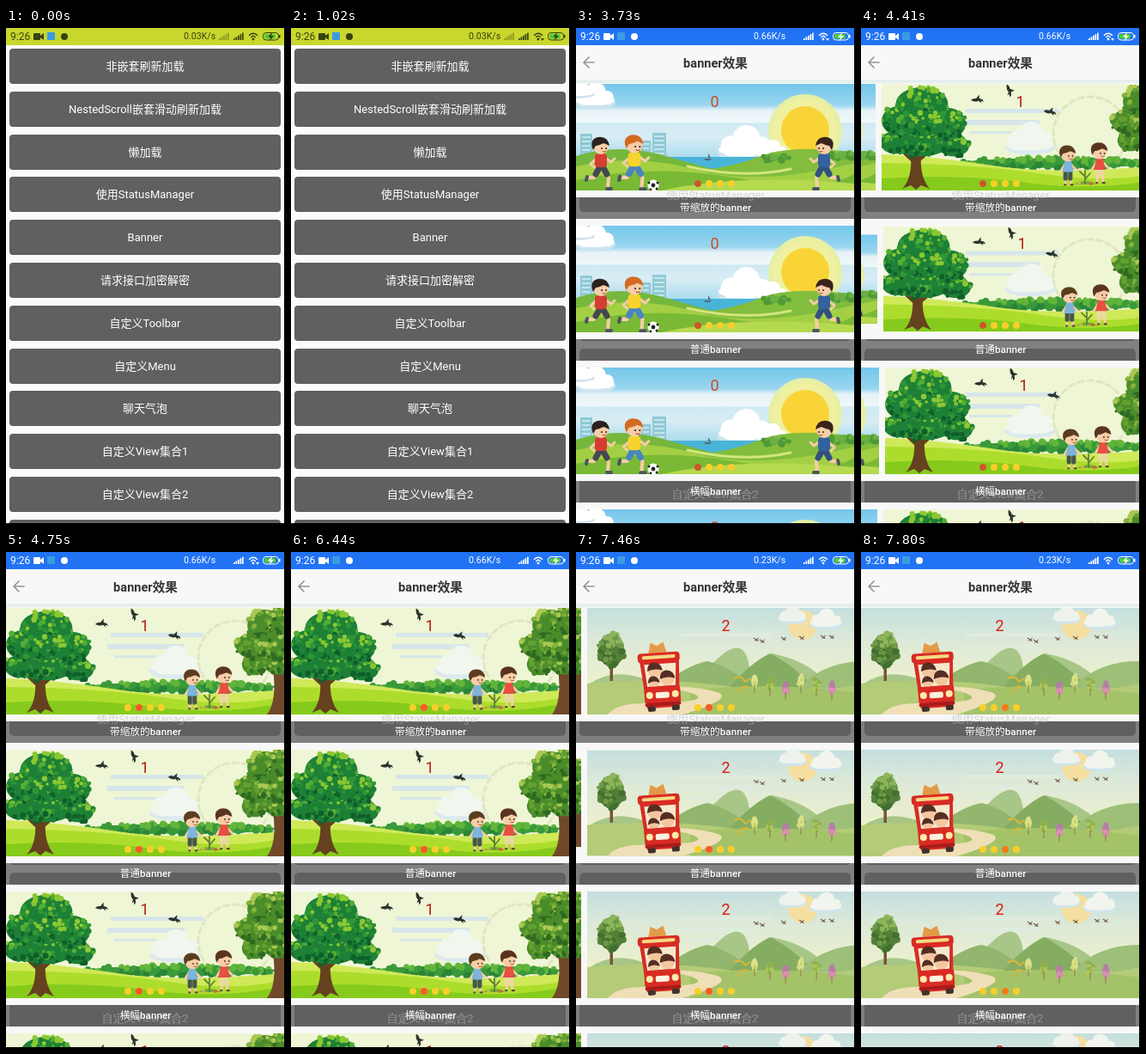
An HTML page for the animation above (8 s loop, 325 by 577 pixels).

```html
<!DOCTYPE html>
<html lang="zh">
<head>
<meta charset="utf-8">
<title>banner</title>
<style>
@property --pos { syntax: "<number>"; inherits: true; initial-value: 0; }
@property --halo { syntax: "<number>"; inherits: true; initial-value: 0; }
html, body { margin: 0; width: 100%; height: 100%; overflow: hidden; }
body { background: #fbfbfb; font-family: Roboto, "Noto Sans CJK SC", "Noto Sans CJK", sans-serif; }
#stage { position: absolute; left: 0; top: 0; width: 325px; height: 577px; overflow: hidden; background: #fbfbfb; }
#stage div, #stage svg { position: absolute; }
.page, #status, #speed, .slides, .active, .arrow, .weak { animation: 8s step-end infinite; }

#status { left: 0; top: 0; width: 325px; height: 20px; animation-name: status; }
#status > div { white-space: nowrap; line-height: 20px; }
#clock { left: 5px; font-size: 12px; }
#rate { left: 207px; width: 40px; height: 20px; overflow: hidden; font-size: 10.6px; }
#speed { animation-name: speed; }
.weak { animation-name: weak; }
.arrow { animation-name: arrow; }

.button { left: 4px; width: 316px; height: 41px; border-radius: 4px; background: #606060;
  color: #fff; font-size: 13px; line-height: 42px; text-align: center; }

.page { animation-name: page; }
#head { left: 0; top: 20px; width: 325px; height: 40px; background: #f8f8f8; border-bottom: 4px solid #e6eeee; }
#title { width: 325px; text-align: center; font: 700 14.6px/42px Roboto, "Noto Sans CJK SC", "Noto Sans CJK", sans-serif; color: #333; }
.block { left: 0; width: 325px; height: 140px; background: #f8f8f8; }
.slides { left: 0; top: 8px; width: 325px; height: 124px; overflow: hidden; animation-name: slides; }
.slide { --d: calc((var(--i) * 332 - var(--pos)) / 332);
  transform: translateX(calc(var(--d) * 332px)) scaleY(calc(1 - var(--shrink) * max(var(--d), -1 * var(--d)))); }
.num { font-size: 18px; text-anchor: middle; }
.fixed { transform: translateX(calc((var(--pos) - var(--i) * 332) * 1px)); }
.halo { opacity: var(--halo); }
.dot { top: 112px; width: 8px; height: 8px; border-radius: 50%; background: #f8cf2a; }
.active { left: 138px; animation-name: active; }
.label { left: 0; width: 325px; height: 25px; }
.tint { inset: 0; background: #808080; mix-blend-mode: darken; }
.text { width: 325px; text-align: center; color: #fff; font-size: 11.7px; font-weight: 500; line-height: 25px; }
#trace { left: 0; top: 189px; width: 325px; height: 8px; overflow: hidden; text-align: center; font-size: 13px; color: #d4d4d4; }
#trace div { top: -4px; width: 325px; line-height: 20px; }
#edge { inset: 0; border: solid #000; border-width: 0 1px 1px 0; }

@keyframes status { 0% { background: #c8d62e; color: #37420f; } 21.25%, 100% { background: #2173f4; color: #fff; } }
@keyframes speed { 0% { transform: none; } 46.625% { transform: translateY(-20px); } 93.25%, 100% { transform: translateY(-40px); } }
@keyframes weak { 0% { opacity: .4; } 21.25%, 100% { opacity: 0; } }
@keyframes arrow { 0% { opacity: 0; } 12.75% { opacity: 1; } 80.5%, 100% { opacity: 0; } }
@keyframes page { 0% { visibility: hidden; } 21.25%, 100% { visibility: visible; } }
@keyframes slides {
  0% { --pos: 0; --halo: 1; }
  55.125% { --pos: calc(308 - var(--lag)); --halo: 1; }
  59.375% { --pos: 332; --halo: 1; }
  89% { --pos: calc(408 + var(--lead)); --halo: 0; }
  93.25% { --pos: 651; --halo: 0; }
  97.5%, 100% { --pos: 664; --halo: 0; }
}
@keyframes active {
  0% { transform: none; background: #c8582a; }
  59.375% { transform: translateX(13px); background: #fb5a28; }
  97.5%, 100% { transform: translateX(26px); background: #f07a1c; }
}
</style>
</head>
<body>
<div id="stage"></div>
<script>
const stage = document.getElementById('stage');
let seed = 11;
const rnd = () => (seed = seed * 16807 % 2147483647) / 2147483647;
const times = (n, fn) => Array.from({ length: n }, (_, i) => fn(i)).join('');
const path = (d, fill, extra = '') => `<path d="${d}" fill="${fill}" ${extra}/>`;
const line = (d, color, w) => path(d, 'none', `stroke="${color}" stroke-width="${w}" stroke-linecap="round" stroke-linejoin="round"`);
const disc = (x, y, r, fill) => `<circle cx="${x}" cy="${y}" r="${r}" fill="${fill}"/>`;
const oval = (x, y, rx, ry, fill) => `<ellipse cx="${x}" cy="${y}" rx="${rx}" ry="${ry}" fill="${fill}"/>`;
const box = (x, y, w, h, fill, rx = 0) => `<rect x="${x}" y="${y}" width="${w}" height="${h}" rx="${rx}" fill="${fill}"/>`;
const at = (x, y, s, art, turn = 0) => `<g transform="translate(${x} ${y}) rotate(${turn}) scale(${s})">${art}</g>`;
const grad = (id, stops) => `<linearGradient id="${id}" x2="0" y2="1">${stops.map(([o, c]) =>
  `<stop offset="${o}" stop-color="${c}"/>`).join('')}</linearGradient>`;

// Scatter leaves inside an oval; colors run from dark (low) to light (high)
const leaves = (x, y, rx, ry, n, r, colors) => oval(x, y, rx * .95, ry * .95, colors[1]) + times(n, () => {
  const a = rnd() * 6.283, d = Math.sqrt(rnd()), lift = .5 - Math.sin(a) * d / 2 + (rnd() - .5) * .7;
  const tone = Math.max(0, Math.min(colors.length - 1, Math.floor(lift * colors.length)));
  return disc((x + Math.cos(a) * d * rx).toFixed(1), (y + Math.sin(a) * d * ry).toFixed(1),
    (r * (.5 + rnd() * .6)).toFixed(1), colors[tone]);
});
const crown = (clumps, colors) => clumps.map(([x, y, rx, ry]) => leaves(x, y, rx, ry, Math.round(rx * ry / 9), 3.2, colors)).join('');
const cloud = (x, y, s, top = '#fff', base = '#cfe4ee') => at(x, y, s,
  oval(0, 7, 24, 7, base) + disc(-12, 1, 9, top) + disc(1, -5, 12, top) + disc(14, 1, 8, top) + oval(0, 4, 23, 6, top));
const swallow = (x, y, turn) => at(x, y, .9, path('M-8 1Q-5-2-1-1L3-6 3-1 7 0 9 3 5 2 6 5 2 2-1 3Q-4 3-8 1Z', '#2d332b'), turn);
const bird = (x, y) => at(x, y, .55, path('M-7-2Q-2-3 0 1L6-3 3 2 5 6 0 4-4 5-2 2Z', '#7b6457'));

const kid = (x, y, s, hair, shirt, pants, run) => {
  const skin = '#f6cda6';
  const legs = run
    ? line('M-2 27L-8 36-15 36M3 27L9 36 8 48', skin, 4) + line('M-2 25L-6 32M3 25L7 32', pants, 7)
      + line('M-16 35L-17 39M7 49L12 49', '#4a5660', 4)
    : line('M-3 28V37M4 28V37', skin, 3) + line('M-3 23V30M3 23V30', pants, 5.5) + line('M-4 38H-3M4 38H6', '#634633', 2.5);
  const arms = run ? 'M-4 13L-12 20-8 24M5 13L12 18 16 14' : 'M-4 13L-9 21M4 13L11 20';
  const body = run ? box(-7, 8, 14, 16, shirt, 4) : path('M-4 8H4L7 22H-7Z', shirt);
  return `<g transform="translate(${x} ${y}) scale(${s})">` + legs + line(arms, skin, 3) + body
    + disc(0, 0, 9, skin) + path('M-9 4Q-14-8-4-11 8-13 10-1 6-3 3-4-3-1-6-1Z', hair)
    + disc(1, 2, 1, '#33241c') + disc(6, 2, 1, '#33241c') + line('M2 5.5Q4 7 6 5.5', '#b64a32', 1) + '</g>';
};
const tower = (x, y, w, h) => box(x, y, w, h, '#8fc9d6') + times(Math.floor(h / 5), i => box(x + 2, y + 3 + i * 5, w - 4, 2, '#c5e5ea'));
const num = (n, c) => `<text class="num" x="161.5" y="26.5" fill="${c}">${n}</text>`;

const shrubs = ['#4f9a35', '#6cb044'];
const football = box(0, 0, 325, 124, 'url(#skyA)')
  + disc(267, 55, 43, '#e6efa5') + disc(267, 55, 38, '#eff0a0') + disc(267, 54, 28, '#f9d437')
  + cloud(22, 15, 1) + cloud(5, 7, .7) + cloud(197, 71, 1.35) + cloud(228, 78, .8)
  + tower(5, 58, 14, 30) + tower(20, 66, 9, 20) + tower(76, 66, 11, 22) + tower(89, 57, 16, 30)
  + box(95, 85, 120, 15, '#48b4d8') + path('M149 87H158L156 89H151ZM154 81L157 86H154Z', '#536a73')
  + path('M0 84Q50 68 105 84T175 102V124H0Z', '#76b73e')
  + path('M140 101Q180 98 215 84T325 80V124H120Z', '#82bd3d')
  + leaves(232, 86, 18, 4, 15, 4, shrubs) + leaves(312, 84, 16, 5, 15, 4, shrubs)
  + path('M0 96Q70 80 140 100T325 92V124H0Z', '#a3cf45')
  + path('M0 112Q90 92 190 110T325 104V124H0Z', '#79b935')
  + path('M100 124Q190 104 325 116V124Z', '#b5d94f')
  + line('M130 96Q195 111 250 99', '#d3e57c', 3)
  + kid(29, 73, 1, '#2b211f', '#d53d32', '#45474f', true) + kid(68, 71, 1.05, '#d56922', '#f7d32d', '#4a86bd', true)
  + `<g transform="translate(289 73) scale(-1 1)">${kid(0, 0, 1, '#3a241b', '#3361a0', '#31517f', true)}</g>`
  + disc(90, 118, 6.5, '#fff') + disc(90, 118, 2.4, '#222') + disc(85, 115, 1.5, '#222') + disc(95, 115, 1.5, '#222') + disc(87, 123, 1.4, '#222') + disc(94, 122, 1.4, '#222')
  + num(0, '#cf4b22');

// Pale leftovers that stay in place while the slides move
const streaks = color => `<g class="fixed">` + box(122, 29, 108, 5, color) + box(118, 42, 90, 6, color) + box(126, 55, 50, 3, color) + '</g>';
const halo = `<g class="fixed"><g class="halo">` + cloud(197, 65, 1.25, '#f1f6ee', '#dce9ee')
  + `<circle cx="267" cy="58" r="43" fill="none" stroke="#e1e6c2" stroke-width="3" stroke-dasharray="9 2"/></g></g>`;

const oak = ['#0f5f2b', '#1d8036', '#2f9636', '#52ad34', '#8cc832'];
const elm = ['#2f6a22', '#4a8c2a', '#63a031', '#86b53c', '#a9c852'];
const hedge = ['#2a8438', '#3a9a3a', '#62b53a'];
const planting = box(0, 0, 325, 124, '#eff6d5') + streaks('#d6e6ea') + halo
  + leaves(205, 92, 115, 6, 130, 4.5, hedge)
  + path('M0 82Q60 84 130 95T325 95V124H0Z', '#cfe958')
  + path('M0 92Q110 93 190 105T325 102V124H0Z', '#addd2c')
  + path('M0 110Q90 104 170 115T325 110V124H0Z', '#86cb1c')
  + path('M24 122Q36 110 34 82H46Q44 108 56 122L46 118 40 123 34 118Z', '#65411f')
  + line('M37 90L24 78M42 90L57 77', '#65411f', 4)
  + crown([[17, 68, 20, 14], [84, 72, 19, 13], [46, 68, 36, 17], [20, 43, 21, 18], [77, 46, 22, 19], [47, 23, 32, 20], [46, 46, 26, 16]], oak)
  + path('M304 124Q316 108 311 72H325V124Z', '#70492a')
  + crown([[318, 66, 18, 12], [290, 66, 16, 13], [285, 44, 18, 15], [312, 46, 22, 18], [302, 20, 22, 19], [322, 14, 16, 18]], elm)
  + swallow(111, 18, 0) + swallow(149, 7, 70) + swallow(196, 32, 10)
  + kid(217, 82, .93, '#5b3d1e', '#7db4dc', '#46564c', false) + kid(254, 79, .95, '#5b3420', '#e65040', '#ead9a0', false)
  + path('M224 117Q237 109 250 117Z', '#73aa3c') + line('M237 116V101M237 108L231 102M237 111L243 104', '#5f8233', 1.8)
  + disc(230, 116, 2, '#d9b442') + disc(244, 116, 2, '#d76439')
  + num(1, '#b01e12');

const face = (x, y, r) => disc(x, y, r, '#f4c69e') + path(`M${x - r - 1} ${y}Q${x - r} ${y - r - 3} ${x} ${y - r - 2}T${x + r + 1} ${y}Q${x} ${y - 4} ${x - r - 1} ${y}Z`, '#542e22');
const bus = `<g transform="rotate(-4 86 90)">` + path('M74 52L77 40 84 44 92 40 95 52Z', '#e39a48')
  + path('M63 60H109L106 116H68Z', '#d92b24') + box(61, 52, 49, 11, '#d92b24', 4) + box(66, 55, 39, 4, '#f7d982', 2)
  + path('M68 65H105L103 91H70Z', '#f5e8cd') + face(80, 73, 8) + face(94, 83, 8) + face(78, 87, 6)
  + box(66, 91, 42, 20, '#d92b24', 3) + disc(72, 101, 4, '#ffe9a8') + disc(102, 101, 4, '#ffe9a8') + box(79, 98, 16, 7, '#fff1df', 2)
  + box(66, 110, 42, 4, '#a81c1a', 2) + box(69, 114, 9, 6, '#40312c', 2) + box(97, 114, 9, 6, '#40312c', 2) + '</g>';
const bushes = [['#c4d466', '#dce28a'], ['#aec75a', '#8fb04c'], ['#d991ae', '#b87ca8']];
const outing = box(0, 0, 325, 124, 'url(#skyC)') + streaks('#dfecdd')
  + disc(251, 20, 17, '#f4dfa0') + cloud(278, 14, .8, '#f1f5ee') + cloud(239, 9, .7, '#edf3ec')
  + path('M0 90Q30 68 70 84T150 61 190 88L215 53Q250 60 270 78T325 62V124H0Z', '#a7c687')
  + path('M85 92Q115 67 140 62 164 67 195 93Z', '#92b66d') + path('M165 93Q190 64 213 53 238 65 265 93Z', '#85ad62')
  + path('M245 93Q278 61 325 62V93Z', '#9dbf78')
  + path('M0 88Q90 80 170 92T325 88V124H0Z', '#b4cb77')
  + path('M120 96Q220 85 325 100V124H120Z', '#a4c369')
  + path('M94 91Q135 92 154 99 168 107 111 124H24Q35 110 72 111 143 110 126 101 117 96 94 94Z', '#efdfb7')
  + box(26.5, 64, 3.5, 21, '#775536') + leaves(28, 49, 16, 20, 70, 3.5, ['#41702f', '#557f38', '#6d9a46', '#8cb55a'])
  + times(6, i => leaves(195 + i * 18, 85 + (i % 3) * 4, 4, 8, 9, 2.5, bushes[i % 3]) + box(194.5 + i * 18, 90 + (i % 3) * 4, 1, 9, '#8b7a50'))
  + line('M172 82Q180 78 184 86L190 82M176 98Q182 88 188 93', '#d6b839', 2)
  + [[197, 36], [204, 38], [229, 35], [250, 34], [275, 33], [285, 33]].map(([x, y]) => bird(x, y)).join('')
  + bus + num(2, '#e01812');

const scenes = [football, planting, outing];
const defs = `<svg width="0" height="0"><defs>`
  + grad('skyA', [[0, '#74c6ea'], [.2, '#9ad6ef'], [.25, '#e6f3f7'], [.36, '#eff7f9'], [.37, '#cfe9f3'], [.5, '#d8edf4'], [.7, '#a8dbed']])
  + grad('skyC', [[0, '#c4dfdf'], [.3, '#dce9d8'], [.7, '#edf0cd']])
  + scenes.map((art, i) => `<g id="scene${i}">${art}</g>`).join('') + '</defs></svg>';

const items = ['非嵌套刷新加载', 'NestedScroll嵌套滑动刷新加载', '懒加载', '使用StatusManager', 'Banner', '请求接口加密解密',
  '自定义Toolbar', '自定义Menu', '聊天气泡', '自定义View集合1', '自定义View集合2', ''];
const list = items.map((t, i) => `<div class="button" style="top:${(24 + i * 49.8).toFixed(1)}px">${t}</div>`).join('');

const bars = (x, cls) => `<g class="${cls}">` + times(5, i => box(x + i * 2.5, 12 - i * 1.6, 1.7, 2 + i * 1.6, 'currentColor')) + '</g>';
const arc = r => line(`M${288 - r} ${13 - r}Q288 ${12 - r * 1.7} ${288 + r} ${13 - r}`, 'currentColor', 1.4);
const status = `<div id="status"><svg width="325" height="20">`
  + box(32, 6, 8, 8, 'currentColor', 1) + path('M40 9L44 6V14L40 11Z', 'currentColor')
  + box(48, 5, 9, 9, '#3b9be0') + disc(68, 10, 4, 'currentColor')
  + bars(248, 'weak') + bars(265, '') + arc(2.4) + arc(4.6) + disc(288, 13, 1.4, 'currentColor')
  + `<path class="arrow" d="M291 12H295L293 15Z" fill="currentColor"/>`
  + `<rect x="299.5" y="5.5" width="18" height="8.5" rx="3.5" fill="none" stroke="currentColor"/>`
  + box(301, 7, 13, 5.5, '#4fce35', 2) + box(318, 8, 1.5, 3.5, 'currentColor') + path('M310 5L305 10.5H308L307 15 312 9H309Z', 'currentColor')
  + `</svg><div id="clock">9:26</div><div id="rate"><div id="speed">0.03K/s<br>0.66K/s<br>0.23K/s</div></div></div>`;

// [label, px behind on first swipe, px ahead on second, height loss per page]
const banners = [['带缩放的banner', 0, 0, 0], ['普通banner', 2, 2, .18], ['横幅banner', 4, 0, 0], ['', 2, 0, 0]];
const blocks = banners.map(([text, lag, lead, shrink], n) => {
  const top = 57 + n * 165;
  const slides = times(3, i => `<svg class="slide" style="--i:${i}" width="325" height="124"><use href="#scene${i}"/></svg>`);
  const dots = times(4, i => `<div class="dot" style="left:${138 + i * 13}px"></div>`);
  return `<div class="block" style="top:${top}px"><div class="slides" style="--lag:${lag};--lead:${lead};--shrink:${shrink}">`
    + `${slides}${dots}<div class="dot active"></div></div></div>`
    + `<div class="label" style="top:${top + 140}px"><div class="tint"></div><div class="text">${text}</div></div>`;
}).join('');

const page = `<div class="page">${blocks}<div id="trace"><div>${items[3]}</div></div><div id="head">`
  + `<svg width="30" height="40">${line('M21 20H9M15 14L9 20 15 26', '#919891', 1.7)}</svg><div id="title">banner效果</div></div></div>`;

stage.innerHTML = defs + list + page + status + '<div id="edge"></div>';
</script>
</body>
</html>
```
